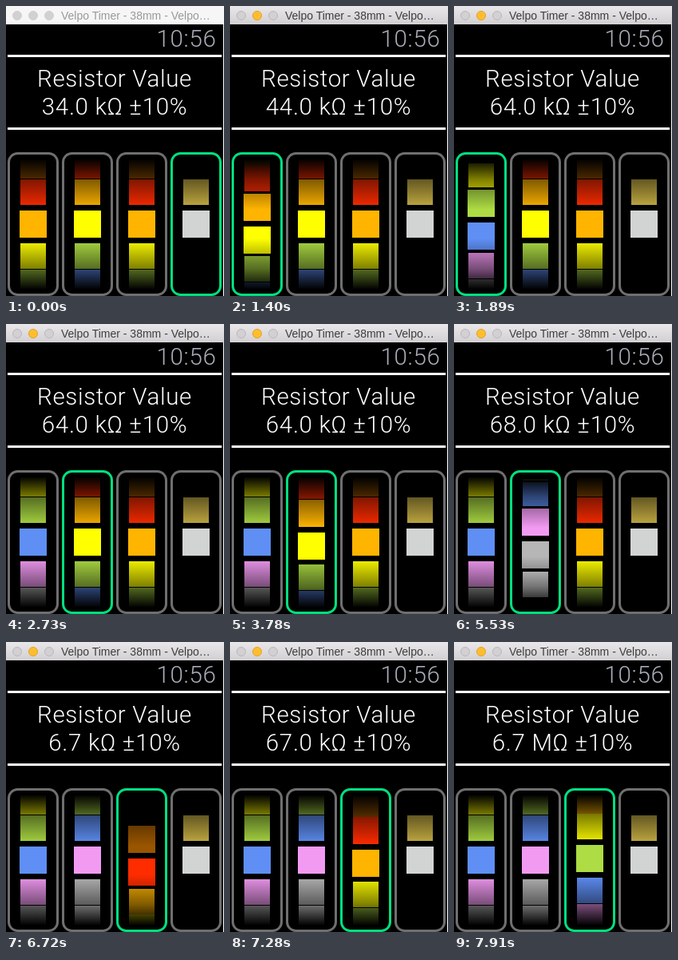
Recreate the animation shown at these times as an HTML page. Size 273 by 363 pixels, loop 8 s.

```html
<!DOCTYPE html>
<html lang="en">
<head>
<meta charset="utf-8">
<title>Resistor picker</title>
<style>
  html, body { margin: 0; width: 100%; height: 100%; overflow: hidden; background: #000; }
  svg { display: block; width: 273px; height: 363px; }
  .bar { font: 14px "Liberation Sans", Arial, sans-serif; }
  .watch { font-family: Roboto, Inter, sans-serif; font-size: 29.5px; font-weight: 350; letter-spacing: .65px; }
</style>
</head>
<body>
<svg id="stage" viewBox="0 0 273 363">
  <defs>
    <linearGradient id="active" x2="0" y2="1">
      <stop stop-color="#e9e7e9"/><stop offset="1" stop-color="#d2d0d2"/>
    </linearGradient>
    <linearGradient id="shade" gradientUnits="userSpaceOnUse" spreadMethod="reflect"
                    x1="0" x2="0" y1="273" y2="355">
      <stop offset=".22" stop-opacity="0"/>
      <stop offset=".68" stop-opacity=".5"/>
      <stop offset="1" stop-opacity="1"/>
    </linearGradient>
  </defs>
  <rect width="273" height="363"/>
  <rect id="bar" width="273" height="23"/>
  <circle class="light" cx="14" cy="12" r="5.5"/>
  <circle class="light" cx="34" cy="12" r="5.5"/>
  <circle class="light" cx="54" cy="12" r="5.5"/>
  <text id="title" class="bar" x="69" y="17">Velpo Timer - 38mm - Velpo…</text>
  <g class="watch">
    <text x="263.5" y="50.5" text-anchor="end" fill="#abaeba">10:56</text>
    <g id="label" fill="#fff" text-anchor="middle">
      <text x="136" y="101">Resistor Value</text>
      <text id="value" x="136" y="136"></text>
    </g>
  </g>
  <path d="M2 62.5H270M2 153.5H270" stroke="#fff" stroke-width="3"/>
  <path d="M272.5 23V363" stroke="#fff"/>
</svg>
<script>
const $ = id => document.getElementById(id);
const stage = $("stage"), lights = document.querySelectorAll(".light");
const LOOP = 8000, TICK = 70, MID = 273, RADIUS = 80, REACH = 2.65;
const digits = ["#000", "#995500", "#ff2c00", "#ffb400", "#ffff00",
  "#addc44", "#5f8ff5", "#f29af2", "#b6b6b6", "#e6e6e6"];
const metals = ["#c8b044", "#d2d4d4"];

const glide = u => 1 - (1 - u) ** 2.5;
const swing = u => u < .5 ? 8 * u ** 4 : 1 - 8 * (1 - u) ** 4;
const move = (to, start, end, ease = glide) => ({ to, start, end, ease });

// Each column rests at an index, then follows its moves.
const columns = [
  { rest: 3, moves: [move(6, 1330, 2310)] },
  { rest: 4, moves: [move(3, 2940, 3290), move(8, 3290, 4560, swing),
                     move(9, 4690, 5250), move(7, 5320, 5880)] },
  { rest: 3, moves: [move(1.6, 6510, 6790), move(5.05, 6790, 7840, swing)] },
  { rest: 1, moves: [] }
];

function position({ rest, moves }, t) {
  return moves.reduce((pos, { to, start, end, ease }) => {
    const u = Math.min(1, Math.max(0, (t - start) / (end - start)));
    return pos + (to - pos) * ease(u);
  }, rest);
}

function set(el, attrs) {
  for (const key in attrs) el.setAttribute(key, attrs[key]);
}

function add(tag, attrs) {
  const el = document.createElementNS("http://www.w3.org/2000/svg", tag);
  set(el, attrs);
  return stage.appendChild(el);
}

const wheels = columns.map((column, i) => {
  const x = 34 + 68 * i;
  const items = (i < 3 ? digits : metals).map(fill => add("rect", { fill }));
  add("rect", { x: x - 18, y: 189, width: 36, height: 168, fill: "url(#shade)" });
  const frame = add("rect", { x: x - 30.5, y: 184.5, width: 61, height: 177, rx: 11,
    fill: "none", "stroke-width": 3 });
  return { column, x, items, frame };
});

// Items sit 30° apart on a drum and flatten toward its rim.
function turn(wheel, pos) {
  wheel.items.forEach((item, i) => {
    const d = i - pos, far = Math.min(REACH, Math.abs(d));
    const w = far < .65 ? 17 : 16;
    const h = Math.floor(17.1 * (1 - (far / REACH) ** 5));
    const y = Math.round(MID + RADIUS * Math.sin(d * Math.PI / 6));
    set(item, { x: wheel.x - w, y: y - h, width: 2 * w, height: 2 * h });
  });
}

function format(ohms) {
  const [div, unit] = ohms >= 1e6 ? [1e6, "MΩ"] : ohms >= 1e3 ? [1e3, "kΩ"] : [1, "Ω"];
  return `${(ohms / div).toFixed(1)} ${unit} ±10%`;
}

function draw(ms) {
  const t = Math.floor(ms / TICK) * TICK;
  const focused = t >= 770;
  const selected = t < 840 ? 3 : t < 2590 ? 0 : t < 6230 ? 1 : 2;

  set($("bar"), { fill: focused ? "url(#active)" : "#f6f6f6" });
  set($("title"), { fill: focused ? "#3e3e3e" : "#999" });
  lights.forEach((light, i) => set(light, focused && i === 1
    ? { fill: "#ffbd2e", stroke: "#e0a32a" }
    : { fill: "#d2d0d2", stroke: focused ? "#bab8ba" : "#d2d0d2" }));

  const pos = wheels.map(wheel => position(wheel.column, t));
  wheels.forEach((wheel, i) => {
    turn(wheel, pos[i]);
    set(wheel.frame, { stroke: i === selected ? "#00e07f" : "#6f6f6f" });
  });

  const [tens, ones, power] = pos.map(Math.round);
  const text = format((10 * tens + ones) * 10 ** power);
  $("value").textContent = text;
  // The longest reading shrinks the whole label to fit.
  set($("label"), { "font-size": text.length > 12 ? 27.5 : 29.5 });
}

function loop() {
  draw(performance.now() % LOOP);
  requestAnimationFrame(loop);
}
loop();
</script>
</body>
</html>
```
